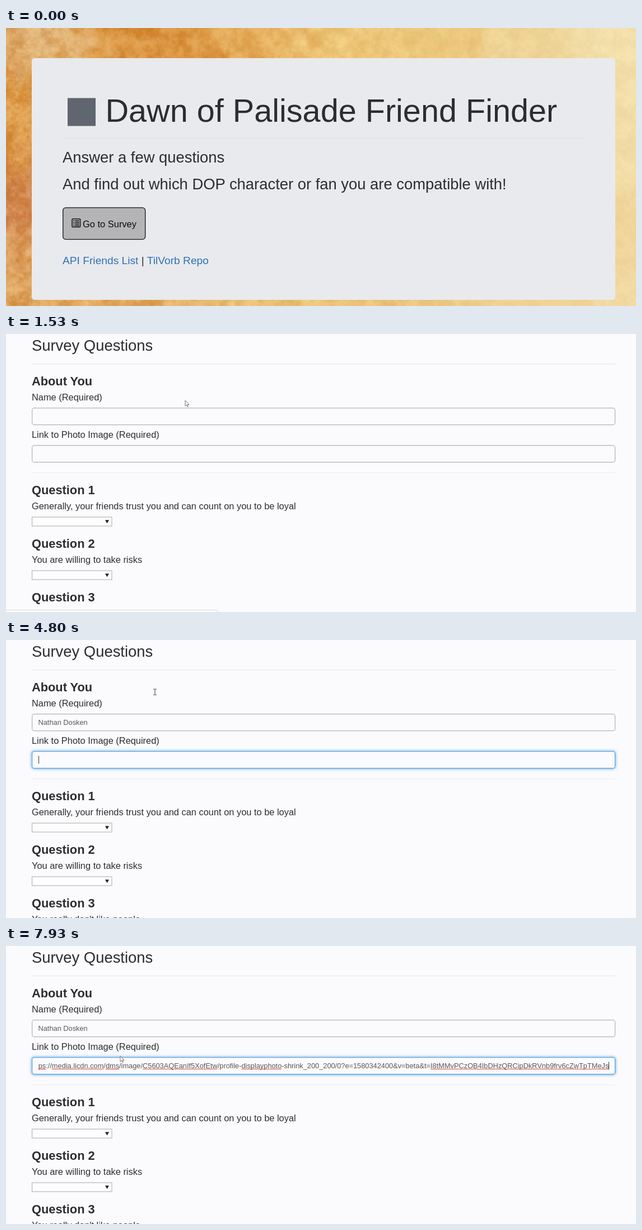
These frames come from a looping animation (1125 px wide and 498 px high, 8000 ms). An HTML page with a canvas:

```html
<!DOCTYPE html>
<html lang="en">
<head>
<meta charset="utf-8">
<title>Friend Finder</title>
<style>
  html, body { margin: 0; width: 1125px; height: 498px; overflow: hidden; background: #fbfafc; }
  canvas, svg { position: absolute; left: 0; top: 0; display: block; }
  text { font-family: "Liberation Sans", Arial, sans-serif; fill: #2d2d30; white-space: pre; }
  .bold { font-weight: 700; }
  .black { fill: #0a0a0c; }
  .link { fill: #2f70b6; }
  .typed { fill: #58585a; }
  .hint { font-family: "Open Sans", "Noto Sans", sans-serif; font-weight: 600; fill: #28282a; }
</style>
</head>
<body>
<canvas id="paint" width="1125" height="498"></canvas>
<svg id="stage" width="1125" height="498" viewBox="0 0 1125 498">
  <defs>
    <filter id="shade" x="-10%" y="-20%" width="120%" height="150%">
      <feDropShadow dx="0" dy="1" stdDeviation="1.5" flood-color="#000" flood-opacity=".3"/>
    </filter>
    <filter id="glow" filterUnits="userSpaceOnUse" x="30" y="120" width="1075" height="125">
      <feGaussianBlur stdDeviation="2"/>
    </filter>
  </defs>
  <g id="home"></g>
  <g id="survey"></g>
  <g id="status">
    <rect x="-5" y="494.5" width="383" height="20" rx="3" fill="#fdfdfd" stroke="#d6d6d8"/>
  </g>
  <g id="arrow">
    <path d="M0 0V10.2L2.4 8 4 11.4 5.4 10.8 3.9 7.5H7Z" fill="#fff" stroke="#66666a" stroke-width=".9"/>
  </g>
  <g id="hand">
    <path d="M0 1Q1 -.6 2 1V5L6 6Q7.5 6.3 7.3 8L6.4 13H.6L-2.7 8.3Q-2.4 6.8 -1 7.6L0 8.6Z"
      fill="#fff" stroke="#55555a" stroke-width=".9"/>
  </g>
  <g id="beam">
    <path d="M-3 -5H-.8L0 -4.4 .8 -5H3M0 -4.4V4.6M-3 5.2H-.8L0 4.6 .8 5.2H3" fill="none" stroke="#3c3c40"/>
  </g>
</svg>
<script>
const LOOP = 8000;
const NAME = "Nathan Dosken";
const URL_TEXT = "ps://media.licdn.com/dms/image/C5603AQEanIf5XofEtw/profile-displayphoto-shrink_200_200/0?e=1580342400&v=beta&t=I8tMMvPCzOB4IbDHzQRCipDkRVnb9frv6cZwTpTMeJs";
const MISSPELT = ["ps", "media.licdn.com", "dms", "C5603AQEanIf5XofEtw", "displayphoto", URL_TEXT.split("t=")[1]];

const byId = id => document.getElementById(id);
const home = byId("home"), survey = byId("survey");

function add(parent, tag, attrs, content) {
  const el = document.createElementNS("http://www.w3.org/2000/svg", tag);
  for (const key in attrs) el.setAttribute(key, attrs[key]);
  if (content) el.textContent = content;
  return parent.appendChild(el);
}
const label = (parent, x, y, size, content, cls = "") =>
  add(parent, "text", { x, y, "font-size": size, class: cls }, content);
const box = (parent, x, y, width, height, fill, more) =>
  add(parent, "rect", { x, y, width, height, fill, ...more });
const rule = (parent, x1, x2, y, stroke, width = 1) =>
  add(parent, "path", { d: `M${x1} ${y}H${x2}`, stroke, "stroke-width": width });
const show = (el, on) => { el.style.visibility = on ? "" : "hidden"; };

// Weathered paint: warped colour points under blotchy value noise
function paintWall() {
  const W = 1125, H = 498;
  const spots = [
    [60, 20, 222, 174, 112], [20, 150, 221, 155, 74], [20, 330, 210, 136, 80], [20, 450, 221, 163, 92],
    [230, 15, 215, 143, 58], [330, 25, 217, 146, 62], [430, 30, 229, 173, 92], [600, 25, 237, 198, 120],
    [780, 25, 236, 199, 124], [900, 20, 239, 212, 150], [1080, 30, 243, 223, 171], [1105, 200, 242, 221, 167],
    [1105, 350, 240, 213, 154], [1105, 470, 240, 215, 159], [150, 495, 225, 168, 94], [500, 495, 233, 193, 118],
    [900, 495, 238, 207, 143]
  ];
  const hash = (x, y) => {
    const n = Math.sin(x * 127.1 + y * 311.7) * 43758.5453;
    return n - Math.floor(n);
  };
  const noise = (x, y) => {
    const i = Math.floor(x), j = Math.floor(y);
    const u = (x - i) ** 2 * (3 - 2 * (x - i)), v = (y - j) ** 2 * (3 - 2 * (y - j));
    const a = hash(i, j), b = hash(i + 1, j), c = hash(i, j + 1), d = hash(i + 1, j + 1);
    return (a + (b - a) * u) * (1 - v) + (c + (d - c) * u) * v;
  };
  const blotch = (x, y) => {
    let sum = 0;
    for (let k = 0, scale = 26, gain = 0.42; k < 4; k++, scale /= 2, gain *= 0.78)
      sum += gain * (noise(x / scale + k * 17, y / scale + k * 9) - 0.5);
    return 0.4 * Math.tanh(sum * 3);
  };
  const ctx = byId("paint").getContext("2d");
  const img = ctx.createImageData(W, H);
  for (let y = 0; y < H; y++) for (let x = 0; x < W; x++) {
    if (x > 52 && x < 1082 && y > 60 && y < 481) continue;
    const wx = x + 70 * (noise(x / 24 + 50, y / 24) - 0.5);
    const wy = y + 70 * (noise(x / 24, y / 24 + 80) - 0.5);
    let total = 0, rgb = [0, 0, 0];
    for (const [px, py, ...tone] of spots) {
      const w = ((wx - px) ** 2 + (wy - py) ** 2 + 900) ** -1.5;
      total += w;
      for (let k = 0; k < 3; k++) rgb[k] += tone[k] * w;
    }
    const n = blotch(x, y) * (1 - 0.75 * Math.min(1, x / 950));
    const at = (y * W + x) * 4;
    for (let k = 0; k < 3; k++) img.data[at + k] = rgb[k] / total + n * [40, 72, 90][k];
    img.data[at + 3] = 255;
  }
  ctx.putImageData(img, 0, 0);
}

// Landing page
box(home, 46, 54, 1042, 433, "#e9eaed", { rx: 5 });
box(home, 110, 125.5, 50, 50, "#5f666f");
label(home, 177.5, 167.5, 57.6, "Dawn of Palisade Friend Finder");
rule(home, 101, 1035, 197.5, "#dcdde0");
label(home, 101, 240.5, 27.4, "Answer a few questions");
label(home, 101, 288.5, 27.4, "And find out which DOP character or fan you are compatible with!");
const ring = box(home, 100.5, 320.8, 149, 58.8, "none", { rx: 5, stroke: "#4a90d9", "stroke-width": 1.6 });
const button = box(home, 101.7, 321.9, 147, 56.7, "#b4b4b6", { rx: 5, stroke: "#111", "stroke-width": 1.3 });
box(home, 118, 342, 14.6, 14.6, "none", { rx: 1, stroke: "#111", "stroke-width": 1.5 });
for (let y = 345.3; y < 356; y += 2.9) {
  rule(home, 120, 121.8, y, "#111", 1.5);
  rule(home, 123, 130.8, y, "#111", 1.5);
}
label(home, 137, 357, 16.45, "Go to Survey", "black");
const links = label(home, 101, 422.5, 19.2, "");
[["API Friends List", "link"], [" | ", ""], ["TilVorb Repo", "link"]]
  .forEach(([words, cls]) => add(links, "tspan", { class: cls }, words));

// Survey page
box(survey, 0, 0, 1125, 498, "#fbfafc");
label(survey, 46, 29.5, 27.4, "Survey Questions");
rule(survey, 46, 1088, 53.5, "#e6e6e8");
label(survey, 46, 92, 21.8, "About You", "bold");
label(survey, 46, 119, 16.4, "Name (Required)");
label(survey, 46, 186, 16.4, "Link to Photo Image (Required)");
rule(survey, 46, 1088, 248.5, "#eeeef0");
["Generally, your friends trust you and can count on you to be loyal",
 "You are willing to take risks", "You really don't like people"].forEach((question, i) => {
  const y = 287 + i * 96;
  label(survey, 46, y, 21.8, "Question " + (i + 1), "bold");
  label(survey, 46, y + 27, 16.4, question);
  box(survey, 46.5, y + 41, 142.5, 16, "#fdfdfd", { stroke: "#aaaaad" });
  add(survey, "path", { d: `M177 ${y + 46.2}h7l-3.5 6z`, fill: "#222" });
});

function field(y) {
  const size = { rx: 4, "stroke-width": 1.2 };
  box(survey, 46.6, y, 1041, 30, "#fbfafc", { ...size, stroke: "#b4b4b8" });
  const focus = add(survey, "g");
  box(focus, 46.6, y, 1041, 30, "none", { rx: 4, stroke: "#66afe9", "stroke-width": 3, filter: "url(#glow)" });
  box(focus, 46.6, y, 1041, 30, "#fbfafc", { ...size, stroke: "#5ea6e0" });
  return focus;
}
const nameFocus = field(132.7), linkFocus = field(199.7);
const typed = label(survey, 57.5, 151.5, 12.8, "", "typed");
const pasted = add(survey, "g");
const address = label(pasted, 57.7, 218.5, 12.8, URL_TEXT, "typed");
for (const word of MISSPELT) {
  const from = URL_TEXT.indexOf(word);
  rule(pasted, address.getStartPositionOfChar(from).x,
    address.getEndPositionOfChar(from + word.length - 1).x, 220.5, "#e04a4a", 1.2);
}
const hint = add(survey, "g");
box(hint, 46, 164, 176, 47, "#fdfcfd", { rx: 3, stroke: "#cfcfd2", "stroke-width": 0.8, filter: "url(#shade)" });
label(hint, 57, 192, 11, NAME, "hint");
const caret = box(survey, 0, 0, 1, 14, "#333");

// Pointer: time, x, y, shape until the next step
const PATH = [
  [330, 172, 262, "arrow"], [440, 153, 306, "hand"], [470, 152, 310, "hand"], [640, 160, 340, "hand"],
  [1080, 160, 340, "hand"], [1190, 205, 280, "arrow"], [1400, 320, 131, "arrow"], [1470, 320, 131, "arrow"],
  [1530, 320, 119, "arrow"], [1900, 320, 119, "arrow"], [2150, 300, 147, "beam"], [2450, 300, 147, "beam"],
  [2850, 266, 93, "beam"], [7550, 266, 93, "arrow"], [7800, 232, 150, "arrow"], [7930, 204, 197, "arrow"],
  [LOOP, 204, 197, "arrow"]
];
const shapes = ["arrow", "hand", "beam"].map(byId);

function movePointer(t) {
  const next = PATH.findIndex(step => step[0] > t);
  const [t0, x0, y0, kind] = PATH[Math.max(0, next - 1)];
  const [t1, x1, y1] = PATH[next];
  const k = Math.max(0, (t - t0) / (t1 - t0));
  for (const shape of shapes) {
    show(shape, next > 0 && shape.id === kind);
    shape.setAttribute("transform", `translate(${x0 + (x1 - x0) * k} ${y0 + (y1 - y0) * k})`);
  }
}

const HOVER = 400, CLICK = 1060, OPEN = 1510, FOCUS = 2300, TYPE = 2885, KEY = 120;
const TAB = 4650, PASTE = 6500, BLINK = 530;
const between = (t, a, b) => t >= a && t < b;
const blinkOn = since => Math.floor(since / BLINK) % 2 === 0;

function render(t) {
  show(home, t < OPEN);
  show(survey, t >= OPEN);
  show(byId("status"), between(t, 620, 1720));
  show(ring, between(t, CLICK, OPEN));
  button.setAttribute("fill", t < HOVER ? "#b4b4b6" : "#7d7d7f");
  button.setAttribute("stroke", t < CLICK ? "#111" : "#14233a");

  const count = t < TYPE ? 0 : Math.min(NAME.length, 1 + Math.floor((t - TYPE) / KEY));
  typed.textContent = NAME.slice(0, count);
  show(nameFocus, between(t, FOCUS, TAB));
  show(linkFocus, t >= TAB);
  show(hint, between(t, TYPE, TAB));
  show(pasted, t >= PASTE);

  const inLink = t >= TAB;
  const busy = between(t, TYPE, TYPE + NAME.length * KEY);
  const since = t >= PASTE ? PASTE : inLink ? TAB : FOCUS;
  const width = inLink ? (t >= PASTE ? address.getComputedTextLength() : 0)
    : count ? typed.getComputedTextLength() : 0;
  caret.setAttribute("x", Math.min(1076, 58 + Math.round(width)));
  caret.setAttribute("y", inLink ? 207.5 : 140);
  show(caret, t >= FOCUS && (busy || blinkOn(t - since)));
  movePointer(t);
}

paintWall();
render(0);
const start = performance.now();
function tick() {
  render((performance.now() - start) % LOOP);
  requestAnimationFrame(tick);
}
requestAnimationFrame(tick);
</script>
</body>
</html>
```
